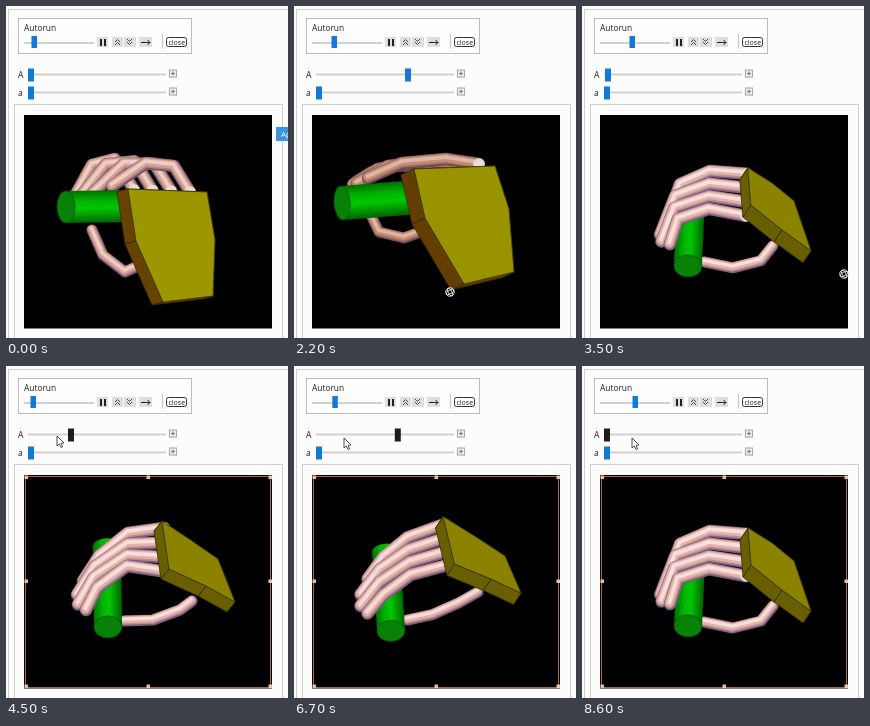
Recreate the animation shown at these times as an HTML page with a canvas. Size 282 px wide and 332 px high, loop 8.7 s.

```html
<!DOCTYPE html>
<html lang="en">
<head>
<meta charset="utf-8">
<title>Hand grip demonstration</title>
<style>
html, body { margin: 0; width: 100%; height: 100%; overflow: hidden; background: #fafafa; }
canvas { display: block; }
</style>
</head>
<body>
<canvas id="stage" width="282" height="332"></canvas>
<script>
const ctx = document.getElementById('stage').getContext('2d');
const LOOP = 8700, STEP = 100, BLUE = '#1278dc';

// Timelines: [ms, value...]
const runKeys = [[0, 28], [2200, 40], [3500, 50], [3790, 52], [3800, 22.5], [4500, 27], [5800, 35], [7500, 46], [8600, 53], [8700, 53.6]];
const gripKeys = [[0, 25], [1570, 150], [2200, 114], [3500, 26], [3800, 25], [4500, 65], [5910, 150], [7500, 57], [8050, 25], [8700, 25]];
const pointerKeys = [[0, 284, 135], [500, 272, 140], [1100, 165, 190], [2200, 156, 286], [3500, 262, 268], [3900, 51, 70], [4500, 51, 70], [5000, 50, 72], [8700, 50, 72]];

// Poses: flat x,y lists; fingers between the first and the last are interpolated.
const frontClosed = {
  face: [122, 183, 201, 186, 209, 234, 207, 290, 157, 296, 130, 235], depth: [-11, 3],
  first: [128, 184, 109, 153, 86, 159, 69, 190], last: [184, 186, 168, 160, 140, 157, 106, 180],
  thumb: [86, 224, 97, 249, 119, 266, 132, 260], rod: [60, 201, 122, 200, 16, 9],
  faceColor: [156, 151, 0], sideColor: [104, 66, 0], skin: [214, 163, 148]
};
const frontOpen = {
  face: [120, 163, 201, 160, 215, 203, 220, 266, 170, 278, 131, 212], depth: [-13, 6],
  first: [128, 161, 102, 159, 78, 166, 62, 176], last: [185, 158, 152, 153, 108, 157, 74, 172],
  thumb: [75, 205, 85, 226, 110, 232, 132, 224], rod: [48, 197, 125, 191, 17, 8],
  faceColor: [154, 147, 0], sideColor: [100, 62, 0], skin: [196, 140, 114]
};
const sideClosed = {
  face: [166, 162, 190, 177, 212, 195, 229, 245, 200, 224, 169, 199], depth: [-8, 12],
  first: [165, 168, 128, 165, 98, 178, 84, 218], last: [164, 210, 127, 203, 96, 213, 88, 238],
  thumb: [122, 256, 151, 262, 179, 255, 191, 240], rod: [106, 260, 109, 195, 14, 11],
  faceColor: [139, 130, 0], sideColor: [104, 96, 0], skin: [226, 180, 170]
};
const sideHalf = {
  ...sideClosed,
  face: [156, 155, 186, 175, 212, 193, 229, 236, 200, 220, 163, 203], depth: [-8, 10],
  first: [158, 162, 122, 167, 93, 190, 77, 215], last: [162, 206, 121, 200, 91, 222, 80, 244],
  thumb: [118, 255, 147, 254, 174, 244, 186, 235], rod: [102, 261, 101, 180, 14, 11]
};
const sideOpen = {
  ...sideClosed,
  face: [142, 146, 178, 167, 210, 187, 225, 218, 194, 206, 158, 193], depth: [-7, 13],
  first: [143, 154, 105, 176, 86, 192, 70, 211], last: [153, 190, 112, 218, 88, 236, 67, 251],
  thumb: [108, 253, 130, 243, 155, 230, 182, 217], rod: [92, 269, 83, 190, 14, 10],
  skin: [222, 174, 162]
};

const mix = (a, b, k) => a.map((v, i) => v + (b[i] - v) * k);
const mixPose = (a, b, k) =>
  Object.fromEntries(Object.keys(a).map(part => [part, mix(a[part], b[part], k)]));

function sample(keys, t) {
  const i = Math.max(1, keys.findIndex(key => key[0] >= t));
  const a = keys[i - 1], b = keys[i];
  return mix(a, b, (t - a[0]) / (b[0] - a[0])).slice(1);
}

function poseAt(t, grip) {
  if (t < 2200) return mixPose(frontClosed, frontOpen, t / 2200);
  if (t < 3500) return mixPose(frontOpen, sideClosed, (t - 2200) / 1300);
  return grip < 65
    ? mixPose(sideClosed, sideHalf, (grip - 25) / 40)
    : mixPose(sideHalf, sideOpen, (grip - 65) / 78);
}

const rgb = c => `rgb(${c.map(v => Math.max(0, Math.min(255, Math.round(v)))).join()})`;
const pairs = list => Array.from({ length: list.length / 2 }, (_, i) => [list[2 * i], list[2 * i + 1]]);

function box(x, y, w, h, fill, stroke) {
  if (fill) { ctx.fillStyle = fill; ctx.fillRect(x, y, w, h); }
  if (stroke) { ctx.lineWidth = 1; ctx.strokeStyle = stroke; ctx.strokeRect(x + .5, y + .5, w - 1, h - 1); }
}

function line(points, color, width = 1, dx = 0, dy = 0) {
  ctx.beginPath();
  points.forEach(([x, y]) => ctx.lineTo(x + dx, y + dy));
  ctx.strokeStyle = color;
  ctx.lineWidth = width;
  ctx.stroke();
}

function polygon(points, fill, stroke) {
  ctx.beginPath();
  points.forEach(([x, y]) => ctx.lineTo(x, y));
  ctx.closePath();
  ctx.fillStyle = fill;
  ctx.fill();
  ctx.strokeStyle = stroke;
  ctx.lineWidth = .8;
  ctx.stroke();
}

function text(label, x, y, size) {
  ctx.font = `${size}px "Open Sans", sans-serif`;
  ctx.fillStyle = '#222';
  ctx.fillText(label, x, y);
}

// A rounded limb lit from the upper left.
function limb(points, width, skin) {
  ctx.lineCap = ctx.lineJoin = 'round';
  const [r, g, b] = skin;
  line(points, rgb([r * .55, g * .52, b * .75]), width);
  line(points, rgb([r * .84, g * .8, b * .88]), width * .82, -.4, -.7);
  line(points, rgb(skin), width * .62, -.6, -1.2);
  line(points, rgb([r + 24, g + 42, b + 50]), width * .3, -.6, -1.8);
  ctx.lineCap = 'butt';
  ctx.lineJoin = 'miter';
}

function drawRod([x, y, farX, farY, radius, cap]) {
  const length = Math.hypot(farX - x, farY - y);
  ctx.save();
  ctx.translate(x, y);
  ctx.rotate(Math.atan2(farY - y, farX - x));
  const shade = ctx.createLinearGradient(0, -radius, 0, radius);
  [[0, '#007000'], [.3, '#00b000'], [.55, '#00c800'], [1, '#006400']].forEach(stop => shade.addColorStop(...stop));
  ctx.fillStyle = shade;
  ctx.fillRect(0, -radius, length, 2 * radius);
  ctx.beginPath();
  ctx.ellipse(length, 0, cap * .7, radius, 0, 0, 7);
  ctx.fill();
  ctx.beginPath();
  ctx.ellipse(0, 0, cap, radius, 0, 0, 7);
  ctx.fillStyle = '#078207';
  ctx.fill();
  ctx.strokeStyle = '#034a03';
  ctx.lineWidth = .8;
  ctx.stroke();
  ctx.restore();
}

function drawFingers({ first, last, skin }) {
  for (let i = 0; i < 4; i++) {
    const joints = pairs(mix(first, last, i / 3));
    const bow = i % 3 ? 1 : 0;
    joints[2][0] -= 4 * bow;
    joints[3][0] -= 7 * bow;
    joints[3][1] += 4 * bow;
    limb(joints, 12.5, skin);
    ctx.beginPath();
    ctx.arc(...joints[0], 5.8, 0, 7);
    ctx.fillStyle = '#eadcd6';
    ctx.fill();
  }
}

function drawPalm({ face, depth, faceColor, sideColor }) {
  const front = pairs(face);
  const back = front.map(([x, y]) => [x + depth[0], y + depth[1]]);
  front.forEach((point, i) => {
    const next = (i + 1) % front.length;
    polygon([point, front[next], back[next], back[i]], rgb(sideColor), '#352800');
  });
  polygon(front, rgb(faceColor), '#3c3700');
}

function drawHand(pose, rodInFront) {
  limb(pairs(pose.thumb), 11, pose.skin);
  if (rodInFront) { drawFingers(pose); drawRod(pose.rod); }
  else { drawRod(pose.rod); drawFingers(pose); }
  drawPalm(pose);
}

function drawSlider(label, y, value, color) {
  text(label, 12, y + 3, 8.5);
  box(22, y - 1, 138, 2, '#d2d2d2');
  box(value - 3, y - 6, 6, 13, color);
  box(163, y - 5, 8, 8, '#eee', '#aaa');
  line([[165, y - 1], [169, y - 1]], '#777');
  line([[167, y - 3], [167, y + 1]], '#777');
}

function drawControls(run, grip, active) {
  box(0, 0, 282, 332, '#fafafa');
  box(2, 3, 290, 340, '#fcfcfc', '#cfcfcf');
  box(12, 12, 174, 36, '#fdfdfd', '#bdbdbd');
  text('Autorun', 18, 25, 8.4);
  box(18, 36, 70, 2, '#d2d2d2');
  box(run - 2.5, 30, 5.5, 12, BLUE);

  [[91, 11], [106, 11], [118, 12], [133, 13]].forEach(([x, w]) => box(x, 31, w, 10, '#dedede'));
  box(94, 33, 2, 7, '#222');
  box(98, 33, 2, 7, '#222');
  for (const dy of [0, 3]) {
    line([[109, 36 + dy], [111.5, 33.5 + dy], [114, 36 + dy]], '#444');
    line([[121, 33 + dy], [123.5, 35.5 + dy], [126, 33 + dy]], '#444');
  }
  line([[135, 36.5], [144, 36.5]], '#222');
  line([[141.5, 34], [144, 36.5], [141.5, 39]], '#222');
  line([[156.5, 28], [156.5, 43]], '#c8c8c8');
  ctx.beginPath();
  ctx.roundRect(160.5, 31.5, 20, 9, 2);
  ctx.strokeStyle = '#333';
  ctx.stroke();
  text('close', 162.5, 38.7, 7);

  drawSlider('A', 68.5, grip, active ? '#1c1c1c' : BLUE);
  drawSlider('a', 86.5, 25, BLUE);
  box(8, 98, 269, 240, '#fcfcfc', '#cfcfcf');
  box(18, 109, 248, 213.5, '#000');
}

function drawSelection() {
  box(19, 110, 246, 212, null, '#a5674c');
  for (const x of [20, 142, 264])
    for (const y of [111, 215, 320])
      if (x !== 142 || y !== 215) box(x - 1.5, y - 1.5, 3.5, 3.5, '#efc092');
}

function drawPointer(x, y, rotating) {
  if (!rotating) {
    polygon([[0, 0], [0, 10], [2.4, 8], [4, 11.5], [5.6, 10.8], [4, 7.4], [7, 7]]
      .map(([dx, dy]) => [x + dx, y + dy]), '#fff', '#222');
    return;
  }
  ctx.strokeStyle = '#ddd';
  ctx.lineWidth = 1;
  for (const [rx, ry] of [[4.3, 4.3], [4.3, 1.8], [1.8, 4.3]]) {
    ctx.beginPath();
    ctx.ellipse(x, y, rx, ry, -.5, 0, 7);
    ctx.stroke();
  }
}

function draw(t) {
  const [run] = sample(runKeys, t);
  const [grip] = sample(gripKeys, t);
  const [x, y] = sample(pointerKeys, t);
  const selected = t >= 3700;
  drawControls(run, grip, selected);
  drawHand(poseAt(t, grip), t < 2900);
  if (selected) drawSelection();
  if (t < 400) {
    box(270, 121, 12, 14, '#3f94df');
    ctx.font = '8px "Open Sans", sans-serif';
    ctx.fillStyle = '#fff';
    ctx.fillText('Ap', 275, 131);
  }
  if (t >= 500) drawPointer(x, y, !selected);
}

function tick(now) {
  draw(Math.floor((now % LOOP) / STEP) * STEP);
  requestAnimationFrame(tick);
}
requestAnimationFrame(tick);
</script>
</body>
</html>
```
